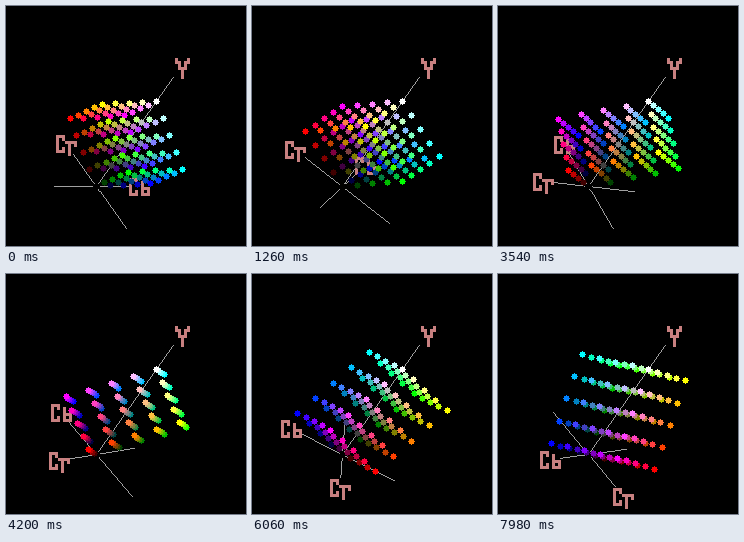
Recreate the animation shown at these times as a matplotlib script. Size 240 by 240 pixels, loop 8 s.

```python
import numpy as np
import matplotlib.pyplot as plt
from matplotlib.animation import FuncAnimation

SIZE, DPI = 240, 80
TICK, HOLD, TICKS = 20, 3, 400     # ms per tick, ticks per pose, ticks per loop
TURN = 256                         # poses in a full turn
CELL, RADIUS = 3, 3                # letter block and dot size in pixels

INK = (200, 128, 128)
GREY = (160, 160, 160)

ORIGIN = np.array([90, 180])
R2 = np.sqrt(0.5)
# rows: the luma axis and two directions of the chroma plane
SCREEN = 120 * np.array([[0.5, -R2], [-0.5, -R2], [-R2, 0]])
NEAR = np.array([0.5, -0.5, R2])

# pen strokes, counted in letter blocks
C = [[(2, 1), (2, 0), (0, 0), (0, 5), (2, 5), (2, 4)]]
SUB_B = [[(4, 1), (4, 5), (6, 5), (6, 3), (4, 3)]]
SUB_R = [[(3, 2), (6, 2), (6, 3)], [(4, 2), (4, 6)]]
ARM = [(0, 0), (0, 1), (1, 1), (1, 3), (2, 3), (2, 6)]
Y = [ARM, [(4 - x, y) for x, y in ARM]]

# every mix of five levels per channel
levels = np.linspace(0, 1, 5)
rgb = np.array(np.meshgrid(levels, levels, levels, indexing="ij")).reshape(3, -1).T
luma = rgb @ [0.299, 0.587, 0.114]
blue_diff = (rgb[:, 2] - luma) / 1.772
red_diff = (rgb[:, 0] - luma) / 1.402
paint = np.round(rgb * 255).astype(np.uint8)

reach = np.arange(-RADIUS, RADIUS + 1)
disc = np.array([(x, y) for x in reach for y in reach
                 if x * x + y * y <= RADIUS ** 2])


def pixels(points):
    return np.round(points).astype(int)


def spin(cb, cr, angle):
    """Place chroma values in the turning plane."""
    return (cr * np.cos(angle) + cb * np.sin(angle),
            cr * np.sin(angle) - cb * np.cos(angle))


def draw_line(canvas, start, end):
    steps = int(np.abs(end - start).max()) + 1
    x, y = pixels(np.linspace(start, end, steps + 1)).T
    canvas[y, x] = GREY


def draw_label(canvas, strokes, corner):
    left, top = pixels(corner)
    for stroke in strokes:
        for (x0, y0), (x1, y1) in zip(stroke, stroke[1:]):
            rows = slice(top + CELL * min(y0, y1), top + CELL * (max(y0, y1) + 1))
            cols = slice(left + CELL * min(x0, x1), left + CELL * (max(x0, x1) + 1))
            canvas[rows, cols] = INK


def draw_dots(canvas, angle):
    space = np.column_stack([luma, *spin(blue_diff, red_diff, angle)])
    order = np.argsort(space @ NEAR, kind="stable")
    centres = pixels(ORIGIN + space @ SCREEN)
    for i in order:
        x, y = (centres[i] + disc).T
        canvas[y, x] = paint[i]


def draw_chroma_axis(canvas, cb, cr, strokes, angle):
    tip = np.array(spin(cb, cr, angle)) @ SCREEN[1:]
    # stop the line at the edge of the label
    dx, dy = np.maximum(np.abs(tip), 1e-6)
    end = tip * (1 - min(10.5 / dx, 10 / dy, 1))
    draw_line(canvas, ORIGIN - tip, ORIGIN + end)
    draw_label(canvas, strokes, ORIGIN + tip - [9.5, 8.3])


def render(pose):
    angle = 2 * np.pi * pose / TURN
    canvas = np.zeros((SIZE, SIZE, 3), np.uint8)
    draw_line(canvas, ORIGIN, ORIGIN + 1.28 * SCREEN[0])
    draw_label(canvas, Y, ORIGIN + 1.4 * SCREEN[0] - [5, 9.4])
    draw_chroma_axis(canvas, 0.5, 0, C + SUB_B, angle)
    draw_chroma_axis(canvas, 0, 0.5, C + SUB_R, angle)
    draw_dots(canvas, angle)
    return canvas


fig = plt.figure(figsize=(SIZE / DPI, SIZE / DPI), dpi=DPI, facecolor="black")
ax = fig.add_axes([0, 0, 1, 1])
ax.axis("off")
view = ax.imshow(render(0), interpolation="nearest", aspect="auto")


def update(tick):
    if tick % HOLD == 0:
        view.set_data(render(tick // HOLD))
    return [view]


anim = FuncAnimation(fig, update, frames=TICKS, interval=TICK,
                     init_func=lambda: update(0),
                     repeat=True, repeat_delay=0, blit=False)
plt.show()
```
